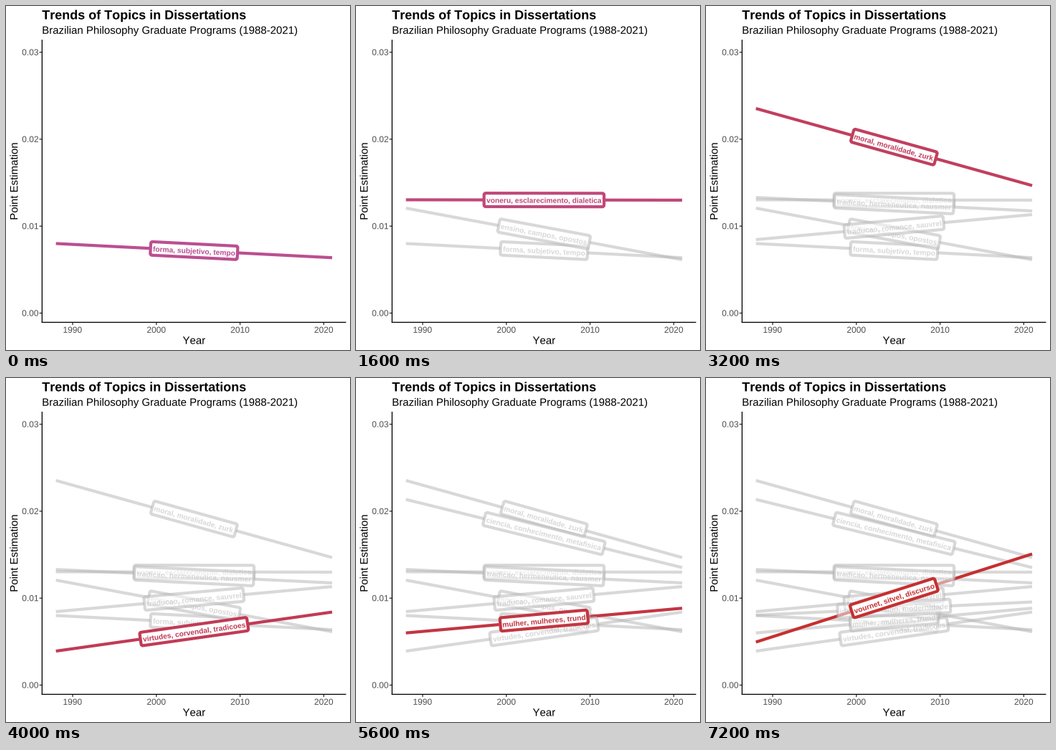
A matplotlib script for the animation above (8 s loop, 480 px wide and 480 px high).

```python
import math

import matplotlib.pyplot as plt
from matplotlib.animation import FuncAnimation
from matplotlib.patches import FancyBboxPatch, PathPatch
from matplotlib.textpath import TextPath
from matplotlib.transforms import Affine2D

SIZE, DPI = 480, 72          # at 72 dpi one point is one pixel
STEP_MS = 800
FONT = "Liberation Sans"
LINE_W, AXIS_W = 4.2, 1.3
LABEL_SIZE = 10.2
HALF_H, PAD = 9.4, 3.5       # label box: half height, side padding
SHADOW = (0.7, 0.7, 0.7, 0.5)

plt.rcParams["text.kerning_factor"] = 6   # plain advances, no pair kerning

# label, estimate in 1988 and in 2021 (thousandths), highlight colour
TOPICS = [
    ("forma, subjetivo, tempo", 8.00, 6.37, "#bb4f91"),
    ("ensino, campos, opostos", 12.07, 6.14, "#bd4c85"),
    ("voneru, esclarecimento, dialetica", 13.03, 12.99, "#c0487a"),
    ("traducao, romance, sauvrel", 8.45, 11.33, "#c14571"),
    ("tradicao, hermeneutica, nausmer", 13.30, 11.75, "#c14268"),
    ("moral, moralidade, zurk", 23.53, 14.67, "#c13f5f"),
    ("virtudes, corvendal, tradicoes", 3.91, 8.40, "#c13b56"),
    ("ciencia, conhecimento, metafisica", 21.35, 13.52, "#c1384b"),
    ("mulher, mulheres, trund", 6.00, 8.84, "#c23642"),
    ("ideias, idealismo, modernidade", 8.04, 9.56, "#c4333a"),
    ("vournet, sitvel, discurso", 4.95, 15.08, "#c53031"),
]
# one topic is never highlighted: it only joins the grey ones
HIGHLIGHTS = [k for k in range(len(TOPICS)) if k != 3]

fig = plt.figure(figsize=(SIZE / DPI, SIZE / DPI), dpi=DPI, facecolor="white")
ax = fig.add_axes([0, 0, 1, 1])
ax.set_xlim(0, SIZE)
ax.set_ylim(0, SIZE)
ax.axis("off")


def px(year):
    return 93.0 + 11.68 * (year - 1990)


def py(thousandths):
    return 51.5 + 12.133 * thousandths


def segment(xs, ys, color, width, z=1):
    return ax.plot(xs, ys, color=color, lw=width, solid_capstyle="butt",
                   snap=False, zorder=z)[0]


def outline(text, size, weight="normal"):
    return TextPath((0, 0), text, size=size, prop={"family": FONT, "weight": weight})


def write(x, y, text, size, align="left", color="black", weight="normal", angle=0):
    glyphs = outline(text, size, weight)
    box = glyphs.get_extents()
    anchor = {"left": 0, "center": (box.x0 + box.x1) / 2, "right": box.x1}[align]
    place = Affine2D().translate(-anchor, 0).rotate_deg(angle).translate(x, y)
    ax.add_artist(PathPatch(place.transform_path(glyphs), fc=color, lw=0))


def draw_axes():
    left, bottom = 50.35, 38.6
    for tenth in range(4):
        y = py(10 * tenth)
        segment([left - 3.75, left], [y, y], "#333333", AXIS_W)
        write(45, y - 4.1, f"{tenth / 100:.2f}", 12, "right", "#4d4d4d")
    for year in range(1990, 2021, 10):
        x = px(year)
        segment([x, x], [bottom - 3.75, bottom], "#333333", AXIS_W)
        write(x, 24.1, str(year), 12, "center", "#4d4d4d")
    segment([left, left], [bottom - 0.6, 433], "black", AXIS_W)
    segment([left - 0.6, 474.5], [bottom, bottom], "black", AXIS_W)
    write(50.2, 461.5, "Trends of Topics in Dissertations", 18, weight="bold")
    write(50.2, 441.2, "Brazilian Philosophy Graduate Programs (1988-2021)", 15)
    write(262.4, 8.4, "Year", 15, "center")
    write(16.2, 235.6, "Point Estimation", 15, "center", angle=90)


def draw_topic(topic, z, active):
    text, start, end, color = topic
    x0, x1, y0, y1 = px(1988), px(2021), py(start), py(end)
    cx, cy = (x0 + x1) / 2, (y0 + y1) / 2
    angle = math.atan2(y1 - y0, x1 - x0)
    ink = color if active else SHADOW
    fill = "white" if active else (1, 1, 1, 0.5)

    glyphs = outline(text, LABEL_SIZE, "bold")
    box = glyphs.get_extents()
    half = box.width / 2 + PAD

    # the line is interrupted by its own label
    dx, dy = half * math.cos(angle), half * math.sin(angle)
    parts = [segment([x0, cx - dx], [y0, cy - dy], ink, LINE_W, 2),
             segment([cx + dx, x1], [cy + dy, y1], ink, LINE_W, 2)]

    place = Affine2D().rotate(angle).translate(cx, cy) + ax.transData
    frame = FancyBboxPatch((-half, -HALF_H), 2 * half, 2 * HALF_H,
                           boxstyle="round,pad=0,rounding_size=2.5",
                           fc=fill, ec=ink, lw=LINE_W, snap=False, zorder=z)
    shift = Affine2D().translate(-(box.x0 + box.x1) / 2, -4.1)
    words = PathPatch(shift.transform_path(glyphs), fc=ink, lw=0, zorder=z + 0.5)
    for patch in (frame, words):
        patch.set_transform(place)
        ax.add_artist(patch)
    return parts + [frame, words]


shown = []


def draw(step):
    while shown:
        shown.pop().remove()
    current = HIGHLIGHTS[step]
    for k in range(current + 1):
        shown.extend(draw_topic(TOPICS[k], 3 + k, k == current))
    return shown


draw_axes()
anim = FuncAnimation(fig, draw, frames=len(HIGHLIGHTS), interval=STEP_MS,
                     init_func=lambda: draw(0), repeat=True, repeat_delay=0,
                     blit=False)
plt.show()
```
